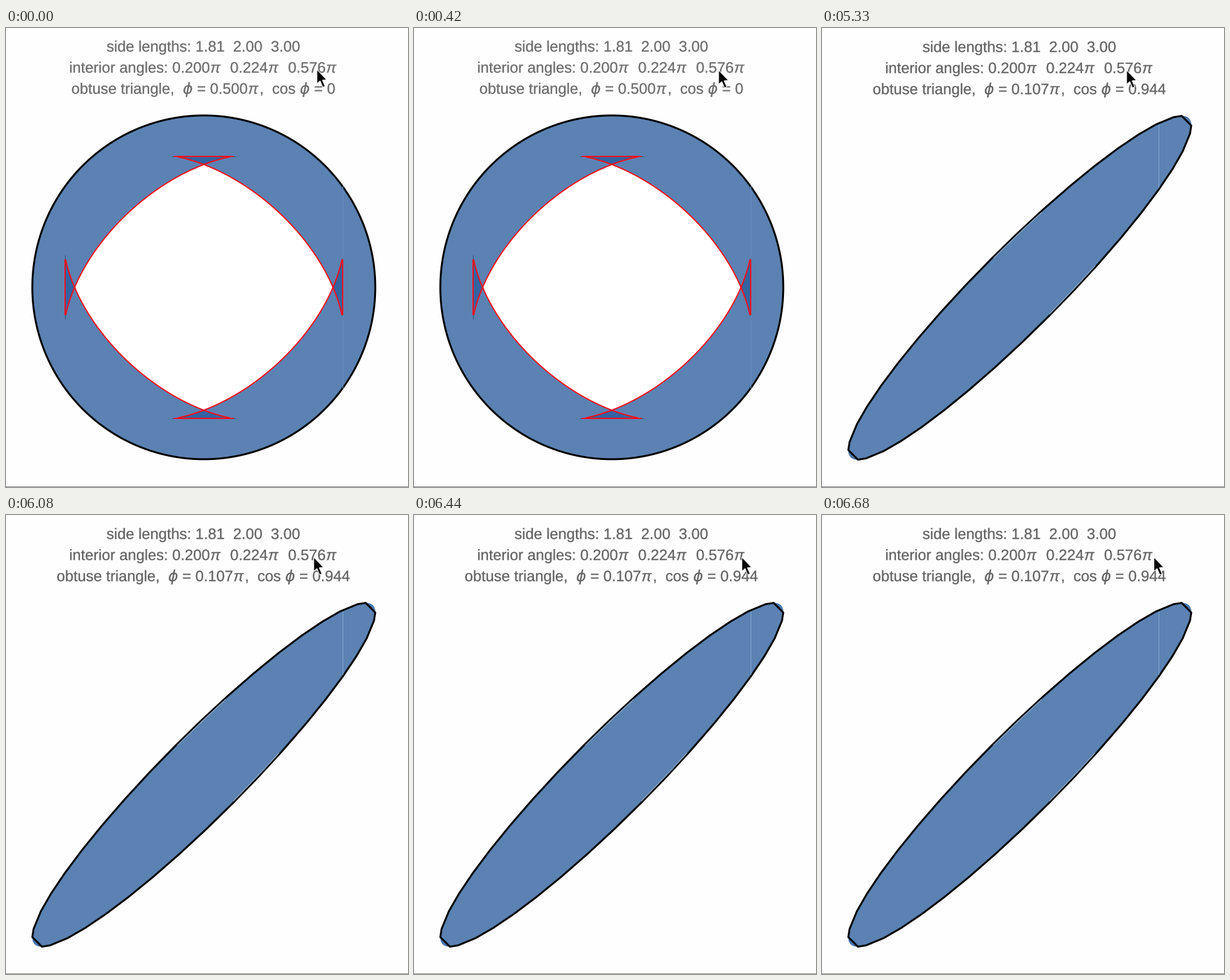
A matplotlib script that plays this animation: 640 by 729 pixels, repeating every 8000 ms.

```python
from itertools import groupby

import matplotlib.pyplot as plt
import numpy as np
from matplotlib.animation import FuncAnimation
from matplotlib.patches import PathPatch, Polygon, Rectangle
from matplotlib.path import Path
from matplotlib.textpath import TextPath

W, H, DPI = 640, 729, 64
PX = 72 / DPI                      # one pixel in points
LOOP, STEP = 8000, 40
CX, CY, R = 314.9, 411.9, 273      # plot centre and half extent
BLUE, DEEP, RED, TIP = "#5b82b2", "#3363a0", "#ff0a12", "#2f4d78"
A, B = 0.2 * np.pi, 0.224 * np.pi  # acute angles of the triangle
SIZE = 24
GREEK = {"π": ("Liberation Sans", 18.8), "ϕ": ("DejaVu Sans", 16)}

fig = plt.figure(figsize=(W / DPI, H / DPI), dpi=DPI, facecolor="#fefefe")
ax = fig.add_axes([0, 0, 1, 1])
ax.set_xlim(0, W)
ax.set_ylim(H, 0)
ax.axis("off")


def line(points, color, width):
    return ax.plot(*np.transpose(points), color=color, lw=width * PX)[0]


def area(points, color):
    return ax.add_patch(Polygon(points, fc=color, lw=0))


def outline(points):
    return ax.add_patch(Polygon(points, fill=False, ec="black", lw=3 * PX,
                                joinstyle="round"))


# ---- text ----
def glyphs(s, font="Liberation Sans", style="normal"):
    return TextPath((0, 0), s, size=SIZE, prop={"family": font, "style": style})


def right_edge(s):
    return glyphs(s).get_extents().x1


def row(text, y, color):
    """One centred line; Greek letters are italic and sit mid-cell."""
    pen, parts = 0, []
    for greek, run in groupby(text, key=lambda c: c in GREEK):
        run = "".join(run)
        if greek:
            font, cell = GREEK[run]
            path = glyphs(run, font, "italic")
            box = path.get_extents()
            parts.append((path, pen + cell / 2 - (box.x0 + box.x1) / 2))
            pen += cell
        else:
            parts.append((glyphs(run), pen))
            pen += right_edge(run + "|") - right_edge("|")
    left = 314.2 - pen / 2
    return [ax.add_patch(PathPatch(
        Path(p.vertices * [1, -1] + [left + x, y], p.codes),
        fc=color, ec=color, lw=0.3 * PX)) for p, x in parts]


def header(phi, cos_phi, dy, color):
    rows = ("side lengths: 1.81  2.00  3.00",
            "interior angles: 0.200π  0.224π  0.576π",
            f"obtuse triangle,  ϕ = {phi}π,  cos ϕ = {cos_phi}")
    out = []
    for k, text in enumerate(rows):
        out += row(text, 37.4 + 33.5 * k + dy, color)
    return out


# ---- curves ----
def ellipse(deg, phi, dy=0):
    u = np.radians(deg)
    return np.column_stack([CX + R * np.cos(u),
                            CY + dy - R * np.cos(u + phi * np.pi)])


def mirror(points, sx, sy):
    return np.array(points) * [sx * R, sy * R] + [CX, CY]


def fold_curve(n=3000):
    """View-angle cosines along the triangle's circumscribed cylinder,
    seen from points where the long side subtends a right angle."""
    d = np.linspace(0, A + B, n + 2)[1:-1]
    p, q, r = (np.exp(2j * v) - np.exp(2j * d) for v in (0, A + B, B))

    def dot(a, b):
        return (a * b.conj()).real

    h2 = -dot(p, q)

    def cosine(a, b):
        return (dot(a, b) + h2) / np.sqrt((dot(a, a) + h2) * (dot(b, b) + h2))

    return np.column_stack([cosine(q, r), cosine(p, r)])


def disc_scene():
    wall, flat = np.cos(A), np.cos(B)
    curve = fold_curve()
    x, y = curve.T
    inside = (x <= wall) & (y <= flat)
    arc = curve[(x >= 0) & (y >= 0)]
    wing, cap = curve[inside & (y <= 0)], curve[inside & (x <= 0)]
    strand = curve[(x <= wall - 0.004) & (y <= flat - 0.004)]
    ring = ellipse(np.arange(360), 0.5)

    out = [area(ring, BLUE)]
    seam = [(wall, -np.sin(A)), (wall, np.sin(A))]
    out.append(line(mirror(seam, 1, 1), "#688cba", 1))
    hole = [mirror(arc, 1, 1), mirror(arc[::-1], -1, 1),
            mirror(arc, -1, -1), mirror(arc[::-1], 1, -1)]
    out.append(area(np.vstack(hole), "white"))

    for s in (1, -1):
        for part, flip in ((wing, (1, -1)), (cap, (-1, 1))):
            whole = np.vstack([part, part[::-1] * flip])
            out.append(area(mirror(whole, s, s), DEEP))
        out.append(line(mirror([(-0.187, flat), (0.187, flat)], 1, s), TIP, 0.9))
    out.append(line(mirror([(wall, -0.185), (wall, 0.185)], -1, 1), TIP, 0.9))

    for s in (1, -1):
        out += [line(mirror(strand, s, t), RED, 1.9) for t in (1, -1)]
        out.append(line(mirror([(-0.172, flat), (0.172, flat)], 1, s), RED, 1.9))
        out.append(line(mirror([(wall, -0.159), (wall, 0.159)], s, 1), RED, 1.9))
    out.append(outline(ring))
    return out + header("0.500", "0", 0, "#6c6c6c")


def ellipse_scene(dy, color, seam):
    phi = 0.107
    span = 180 * (1 - phi)
    near = np.array([0, 7, 18.2])
    half = np.concatenate([near, np.linspace(27, span - 27, 13),
                           span - near[::-1]])
    out = [area(ellipse(np.arange(360), phi, dy), BLUE)]
    for start in (span, span + 180):
        out.append(area(ellipse(np.linspace(start, start + 180 - span, 20),
                                phi, dy), "#4d78aa"))
    if seam:
        out.append(line([(535.5, 153), (535.5, 253)], "#86a6cf", 1))
    w = np.linspace(81, 97, 12)
    for deg, shift in ((180 + w, 1.3), (span - w, -1.3)):
        out.append(line(ellipse(deg, phi, dy) + shift, "#a5bedb", 1))
    out.append(outline(ellipse(np.concatenate([half, 180 + half]), phi, dy)))
    return out + header("0.107", "0.944", dy, color)


scenes = [(0, disc_scene()),
          (5210, ellipse_scene(0.1, "#6c6c6c", False)),
          (5330, ellipse_scene(0.7, "#636363", True))]

ax.add_patch(Rectangle((0, 728), W, 1, fc="#8a8a8a", lw=0))

# ---- pointer ----
ARROW = np.array([(0, 0), (0, 22.5), (5, 18), (9.3, 28), (13, 26.5),
                  (8.7, 16.8), (15.5, 16.2)])
TRACK = [(0, 495, 66), (150, 490, 66.5), (270, 486, 67), (420, 485, 67),
         (6080, 490, 67), (6200, 500, 68), (6320, 512, 68), (6440, 522, 67),
         (6560, 526, 67), (6680, 528.5, 67)]
pointer = ax.add_patch(Polygon(ARROW, fc="black", ec="white", lw=PX,
                               joinstyle="miter", zorder=5))


def latest(steps, t):
    return [s for s in steps if s[0] <= t][-1]


def draw(n):
    t = n * STEP + 30
    current = latest(scenes, t)
    for scene in scenes:
        for artist in scene[1]:
            artist.set_visible(scene is current)
    pointer.set_xy(ARROW + latest(TRACK, t)[1:])
    return []


anim = FuncAnimation(fig, draw, frames=LOOP // STEP, interval=STEP,
                     repeat=True, repeat_delay=0, blit=False)
plt.show()
```
